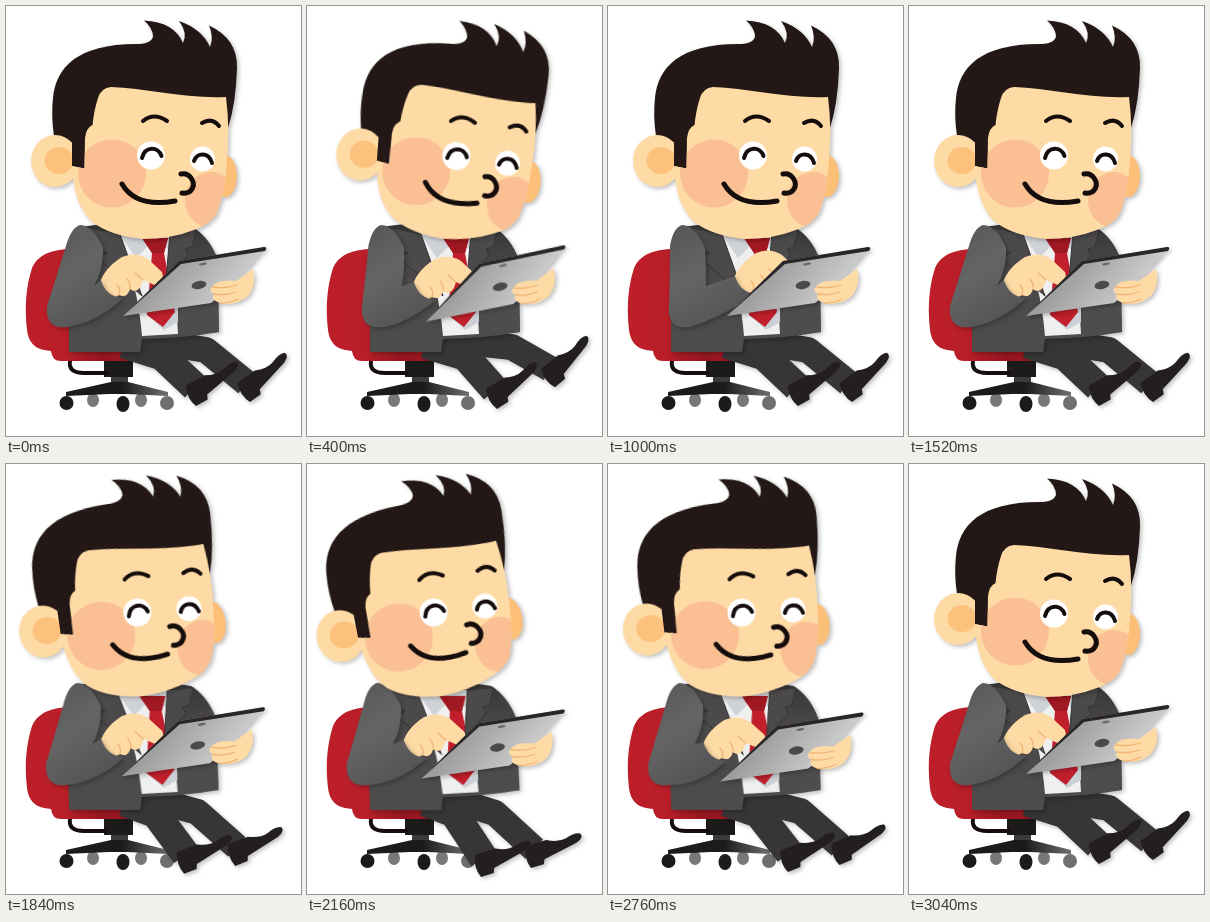
Write an HTML page that moves like this. It is 295x430 px and loops after 3.08 s.

```html
<!DOCTYPE html>
<html lang="en">
<head>
<meta charset="utf-8">
<title>Office worker with tablet</title>
<style>
html, body { margin: 0; width: 100%; height: 100%; overflow: hidden; background: #fff; }
svg { display: block; width: 295px; height: 430px; }
.shade { filter: drop-shadow(2px 2px 2px rgba(0, 0, 0, .25)); }
.line { fill: none; stroke: #150d0c; stroke-linecap: round; stroke-linejoin: round; }
.skin { fill: #fedaa5; }
.cloth { fill: none; stroke: #373535; stroke-linejoin: round; }
.crease { fill: none; stroke: #efb475; stroke-width: 1.3; stroke-linecap: round; }
</style>
</head>
<body>
<svg viewBox="0 0 295 430">
  <defs>
    <linearGradient id="metal" x1="0" y1="0.2" x2="1" y2="0.6">
      <stop offset="0" stop-color="#c9c9c9"/>
      <stop offset=".3" stop-color="#9c9c9c"/>
      <stop offset="1" stop-color="#dedede"/>
    </linearGradient>
    <linearGradient id="sleeveFill" x1="0" y1="0" x2=".5" y2="1">
      <stop offset="0" stop-color="#565555"/>
      <stop offset=".5" stop-color="#666565"/>
      <stop offset="1" stop-color="#565555"/>
    </linearGradient>
    <linearGradient id="coat" x1="0" y1="0" x2="0" y2="1">
      <stop offset="0" stop-color="#373434"/>
      <stop offset=".35" stop-color="#4a4848"/>
      <stop offset="1" stop-color="#4e4c4c"/>
    </linearGradient>
    <linearGradient id="red" x1="0" x2="1">
      <stop offset="0" stop-color="#bd1f29"/>
      <stop offset=".25" stop-color="#b91e28"/>
      <stop offset=".5" stop-color="#951620"/>
      <stop offset="1" stop-color="#b91e28"/>
    </linearGradient>
    <linearGradient id="base" x1="0" x2="1">
      <stop offset=".55" stop-color="#1d1a1a"/>
      <stop offset="1" stop-color="#6f6f70"/>
    </linearGradient>
    <clipPath id="faceClip"><path id="faceShape" d="M66 160L78.500 162.500L79 132Q80 122 86.500 119Q88 104 92 92Q95 82 105 81C140 82 180 93 220 91Q224 122 221 155Q219 187 211 207Q205 218 188 224Q165 233 137 233Q104 230 85 215C73 203 67 185 66 160Z"/></clipPath>
    <path id="shoe" d="M0 0L13 3L16 -1L52 0Q61 -1 60 -6Q56 -10 45 -9Q36 -9 27 -17L6 -22Q-2 -11 0 0Z" fill="#231f1e"/>
  </defs>

  <g id="chair">
    <path d="M105 362H122V384H105Z" fill="#3c3a3a"/>
    <g fill="#77787a"><ellipse cx="87" cy="394" rx="6" ry="7"/><ellipse cx="135" cy="394" rx="6" ry="7"/></g>
    <path d="M105 376H122L162 386V390L121 388H103L60 390V386Z" fill="url(#base)"/>
    <circle cx="161" cy="397" r="7" fill="#6f6f70"/>
    <g fill="#1d1a1a">
      <circle cx="60.500" cy="397" r="7"/>
      <ellipse cx="117" cy="398" rx="6.500" ry="8"/>
      <path d="M98 354H127V371H98Z"/>
    </g>
    <path class="line" d="M64 355Q62 367 78 367H100" stroke-width="4"/>
    <path d="M66 243Q34 243 26 262Q17 290 21 324Q23 341 38 344L45 345Q46 355 55 355H168Q176 355 176 346L64 340Z" fill="url(#red)"/>
  </g>

  <g class="shade">
    <path id="leg2" class="cloth" stroke-width="26"/>
    <use id="shoe2" href="#shoe"/>
    <path id="leg1" class="cloth" stroke-width="29"/>
    <use id="shoe1" href="#shoe"/>
  </g>

  <g id="upper">
    <g class="shade">
      <path d="M74 221Q130 212 188 222Q204 232 212 254L213 326Q180 332 136 333L134 346H63V250Q65 228 74 221Z" fill="url(#coat)"/>
      <path d="M112 226H166L172 328L136 330Q132 280 112 226Z" fill="#efeff0"/>
      <path d="M112 226H164L162 243L146 236L130 252Z" fill="#cfd2d6"/>
      <path d="M138 306L158 324L172 316V300Z" fill="#cbd0d6"/>
      <path d="M136 232H162L158 247L169 306L157 321L141 309L146 247Z" fill="#c01f2b"/>
      <path d="M136 232H162L158 247H146Z" fill="#a01822"/>
      <path d="M84 222L114 228L136 290L120 276L92 252L101 247L86 240Z" fill="#4b4949" stroke="#373434"/>
      <path d="M164 226L190 224L186 241L179 243L182 250L160 274Z" fill="#4b4949" stroke="#373434"/>
      <path d="M172 295L174 329L213 326L211 290Z" fill="#4e4c4c"/>
    </g>
    <g id="hand">
      <path class="skin" d="M92 284Q95 264 116 251Q130 245 142 253L156 266Q159 274 151 280L137 274L135 280Q130 288 124 283Q121 293 113 289Q105 295 98 290Z"/>
      <path class="crease" d="M137 274L129 267M124 283Q125 278 121 273M113 289Q115 283 111 279"/>
    </g>
    <path id="sleeve" class="shade" fill="url(#sleeveFill)"/>
  </g>

  <g id="tablet" class="shade">
    <path d="M260 241L173 255L117 310L205 297Q232 277 260 241Z" fill="url(#metal)"/>
    <path d="M117 310L173 255L258 241Q262 241 259 245L175 258Z" fill="#292625"/>
    <ellipse cx="193" cy="279" rx="7.500" ry="4" fill="#4b4a4a" transform="rotate(-12 193 279)"/>
    <ellipse cx="197" cy="258" rx="4" ry="1.300" fill="#6c6b6b" transform="rotate(-10 197 258)"/>
    <path class="skin" d="M206 281Q211 273 230 275L247 263Q251 279 242 290Q231 300 214 297Q204 294 208 288Q202 285 206 281Z"/>
    <path class="crease" d="M208 288Q219 290 230 286M207 281Q219 283 231 279M214 297Q225 297 232 293"/>
  </g>

  <g id="head" class="shade">
    <path d="M70 150L48 130Q45 110 47 92C50 61 72 37 134 38Q145 37 147 31Q147 22 138 14.500Q168 16 177 37Q182 27 173 15Q196 23 204 41Q208 31 203 19.500Q232 33 231 62Q230 97 222 122L200 130L100 150Z" fill="#231815"/>
    <ellipse class="skin" cx="49" cy="155" rx="24" ry="26"/>
    <ellipse cx="53" cy="154.500" rx="14.500" ry="13.500" fill="#fcc17c"/>
    <ellipse cx="219" cy="170" rx="12" ry="21" fill="#fcbf78"/>
    <path d="M66 110V160L79 163V132L92 110Z" fill="#231815"/>
    <use href="#faceShape" class="skin"/>
    <g clip-path="url(#faceClip)" fill="#fabf92">
      <circle cx="106" cy="167.500" r="34"/>
      <ellipse cx="205" cy="194" rx="26" ry="28"/>
    </g>
    <g fill="#fff"><circle cx="145" cy="149.500" r="14"/><circle cx="196.500" cy="153" r="12.500"/></g>
    <path class="line" stroke-width="4" d="M136 152C139 140 152 140 155.500 150M188 155C191 146 203 146 206 157M137 115Q148 106 161 115M196 117Q206 111 213 120"/>
    <path class="line" stroke-width="5" d="M175 168C184 166 190 177 186 183Q183 188 176 187M116 178Q130 202 169 195"/>
  </g>
</svg>
<script>
const LOOP = 3080, STEP = 40;
const $ = id => document.getElementById(id);

// head angle, x, y; then knee x, y, heel x, y, shoe angle for each leg
const mid = [0, 0, 0, 156, 350, 190, 400, -42, 200, 344, 244, 396, -49];
const right = [4.3, 0, 0, 158, 350, 190, 403, -45, 205, 341, 248, 381, -53];
const left = [-11, -6.7, -1.2, 147, 349, 174, 413, -31, 188, 349, 224, 404, -29];
const lean = [
  [0, mid], [440, right], [560, right], [1000, mid],
  [1520, mid], [2000, left], [2560, left], [3040, mid]
];
// tablet x, y, angle; hand x, y; elbow x
const swipe = [
  [0, [0, 0, 0, 0, 0, 0]],
  [400, [0, 2, -3, 12, 2, 14]],
  [840, [2, 0, 0, 32, -4, 20]],
  [1040, [2, 0, 0, 32, -4, 20]],
  [1500, [0, 0, 0, 0, 0, 0]],
  [2160, [-2.5, 4.5, 0, 4, 2, 0]],
  [2480, [-9.5, 15, 0, 4, 10, 0]],
  [3040, [0, 0, 0, 0, 0, 0]]
];

function sample(keys, t) {
  const i = keys.findIndex(k => k[0] > t);
  if (i < 0) return keys[keys.length - 1][1];
  const [t0, a] = keys[i - 1], [t1, b] = keys[i];
  const u = (t - t0) / (t1 - t0), k = u * u * (3 - 2 * u);
  return a.map((v, n) => v + (b[n] - v) * k);
}

const place = (id, transform) => $(id).setAttribute('transform', transform);

function drawLeg(n, hip, [kx, ky, x, y, angle]) {
  const r = angle * Math.PI / 180, c = Math.cos(r), s = Math.sin(r);
  const ax = x + 12 * c + 15 * s, ay = y + 12 * s - 15 * c;
  $('leg' + n).setAttribute('d', `M${hip}L${kx} ${ky}L${ax} ${ay}`);
  place('shoe' + n, `translate(${x} ${y}) rotate(${angle})`);
}

function drawSleeve(x, y, e) {
  $('sleeve').setAttribute('d',
    `M74 219Q65 222 ${60 + e * .1} 240Q${50 + e * .6} 272 ${41 + e} 300Q${39 + e} 324 ${62 + e} 321` +
    `Q${92 + x * .6} ${316 + y} ${117 + x} ${292 + y}` +
    `Q${100 + x} ${291 + y} ${95 + x} ${274 + y}` +
    `L${88 + e * .5} 280Q98 262 97 242Q88 220 74 219Z`);
}

function draw(t) {
  const p = sample(lean, t);
  const [tx, ty, ta, hx, hy, e] = sample(swipe, t);
  place('head', `translate(${p[1]} ${p[2]}) rotate(${p[0]} 140 210)`);
  const tilt = Math.max(0, -p[0]) * .003;
  place('upper', `matrix(1 0 ${tilt} 1 ${-340 * tilt} 0)`);
  drawLeg(1, '118 338', p.slice(3, 8));
  drawLeg(2, '140 334', p.slice(8));
  place('tablet', `translate(${tx} ${ty}) rotate(${ta} 188 275)`);
  place('hand', `translate(${hx} ${hy})`);
  drawSleeve(hx, hy, e);
}

const start = performance.now();
function tick() {
  const t = Math.max(0, performance.now() - start) % LOOP;
  draw(Math.floor(t / STEP) * STEP);
  requestAnimationFrame(tick);
}
tick();
</script>
</body>
</html>
```
